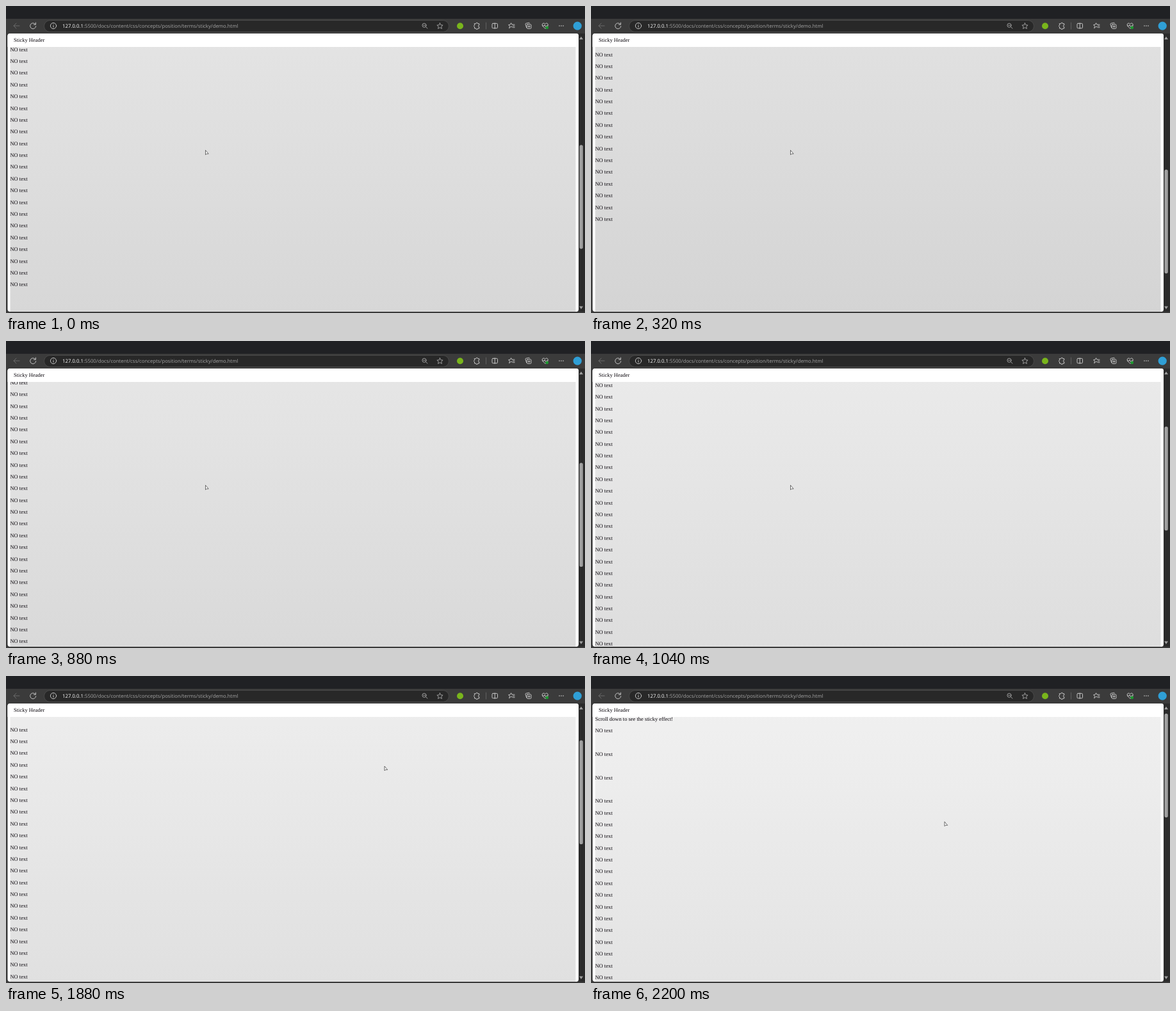
An HTML page that plays this animation: 904 px wide and 480 px high, repeating every 2380 ms.

```html
<!DOCTYPE html>
<html lang="en">
<head>
<meta charset="utf-8">
<title>Sticky header</title>
<style>
  html, body { margin: 0; height: 100%; overflow: hidden; background: #3b3b3b; }
  svg { display: block; }
  text { white-space: pre; text-rendering: geometricPrecision; }
  .page { font: 8.47px "Liberation Serif", "Times New Roman", serif; fill: #0c080e; }
  .url { font: 7.79px "Open Sans", "Noto Sans", sans-serif; fill: #a5a5a5; }
  .icon { fill: none; stroke: #d2d2d2; stroke-width: .9; stroke-linecap: round; stroke-linejoin: round; }
</style>
</head>
<body>
<svg width="904" height="480" viewBox="0 0 904 480">
  <defs>
    <linearGradient id="shade" x2="0" y2="1">
      <stop stop-color="#f0f0f0"/><stop offset="1" stop-color="#d0d0d0"/>
    </linearGradient>
    <clipPath id="view"><rect x="2.5" y="43" width="891.5" height="435" rx="4"/></clipPath>
    <path id="star" d="M0-4.6 1.4-1.6 4.6-1.3 2.2.9 2.9 4.1 0 2.4-2.9 4.1-2.2.9-4.6-1.3-1.4-1.6Z"/>
  </defs>

  <!-- browser frame -->
  <rect width="904" height="480" fill="#3b3b3b"/>
  <rect width="904" height="20" fill="#202124"/>
  <rect x="59.5" y="22.5" width="632" height="18" rx="9" fill="#282828" stroke="#505050" stroke-width=".8"/>
  <text class="url" x="88" y="34"><tspan fill="#fff">127.0.0.1</tspan>:5500/docs/content/css/concepts/position/terms/sticky/demo.html</text>

  <g class="icon">
    <path d="M21 31H12M16 27 12 31 16 35" stroke="#707070"/>
    <path d="M45.9 28.6A4.5 4.5 0 1 0 46.7 31.6M46.4 26V29H43.4"/>
    <circle cx="74" cy="31" r="4.6"/>
    <path d="M74 30.5V33.3M74 28.6V28.7"/>
    <g stroke="#a8a8a8">
      <circle cx="653" cy="30.2" r="3.1"/><path d="M655.3 32.5 658 35M651.6 30.2H654.4"/>
      <use href="#star" x="677.5" y="31.3"/>
    </g>
    <path d="M731.5 27.7H733.7A1.5 1.5 0 0 1 736.7 27.7H738.8V29.9A1.4 1.4 0 0 0 738.8 32.7V35H736.7A1.5 1.5 0 0 1 733.7 35H731.5V32.7A1.5 1.5 0 0 1 731.5 29.9Z"/>
    <path d="M749.5 26V36" stroke="#666"/>
    <rect x="759" y="27.3" width="8.5" height="7.4" rx="1.3"/><path d="M763.2 26.6V35.4"/>
    <path d="M791 33.3 788.5 32 785.7 34.7 786.4 31.5 784.6 29.5 787.2 29.1 788.6 26.6 790 29.1H794M791.5 31.3H794M792 33.6H794"/>
    <path d="M812.5 33.5 811 28.5Q810.8 27.5 811.8 27.2L816.5 26.2Q817.3 26.2 817.5 27"/>
    <rect x="813.3" y="28.7" width="6.6" height="6.7" rx="1.3"/><path d="M816.6 30.4V33.7M815 32H818.2"/>
    <path d="M841.7 35.2 838 31.5C835.5 28.5 839 25 841.7 28.2 844.4 25 848 28.5 845.4 31.5ZM837.5 31H840L841 29.5 842.5 32.5 843.5 31H846"/>
  </g>
  <circle cx="709" cy="31.3" r="5" fill="#79b51c"/>
  <circle cx="844.7" cy="33.8" r="2.4" fill="#1c9a30"/>
  <g fill="#d2d2d2"><circle cx="864" cy="31" r=".8"/><circle cx="867" cy="31" r=".8"/><circle cx="870" cy="31" r=".8"/></g>
  <circle cx="892.2" cy="31.2" r="6.6" fill="#2f9fd6"/>

  <!-- page -->
  <g clip-path="url(#view)">
    <rect y="43" width="894" height="435" fill="#fff"/>
    <g id="content" class="page">
      <rect x="6.5" y="47" width="883" height="1096" fill="url(#shade)"/>
      <text x="6.5" y="69.8">Scroll down to see the sticky effect!</text>
    </g>
    <rect y="43" width="894" height="21" fill="#fff"/>
    <text class="page" x="12" y="56">Sticky Header</text>
  </g>

  <!-- scrollbar -->
  <rect x="894" y="43" width="10" height="435" fill="#2b2b2b"/>
  <path d="M895 52.2 898 47.8 901 52.2ZM895 469.5 898 473.9 901 469.5Z" fill="#a0a0a0"/>
  <rect id="thumb" x="895.4" width="5.4" height="162.5" rx="2.7" fill="#a0a0a0"/>

  <path id="cursor" d="M0 0V7L1.7 5.6H4.7Z" fill="#fff" stroke="#333" stroke-width=".7" stroke-linejoin="round"/>
</svg>
<script>
const LOOP = 2380, STEP = 40, PITCH = 18.38;
const $ = id => document.getElementById(id);

function addRow(y) {
  const row = document.createElementNS('http://www.w3.org/2000/svg', 'text');
  row.setAttribute('x', 6.5);
  row.setAttribute('y', y);
  row.textContent = 'NO text';
  $('content').append(row);
}
// The first rows are double spaced.
for (let i = 0; i < 3; i++) addRow(88.1 + i * 2 * PITCH);
for (let i = 0; i <= 36; i++) addRow(198.2 + i * PITCH);

const linear = u => u;
const easeIn = u => u * u;
const easeOut = u => u * (2 - u);
const smooth = u => u * u * (3 - 2 * u);

// Keys: time, value, easing towards that value.
const scrollKeys = [
  [0, 421.6], [320, 524], [480, 557.5, easeOut], [560, 557.5], [760, 464, easeIn],
  [1040, 199.9], [1080, 199.9], [1120, 168], [1280, 111.5, easeOut],
  [1880, 111.5], [2200, 0, smooth]
];
const cursorX = [[1120, 311.5], [1400, 575.5, smooth], [1840, 575.5], [1880, 591], [2200, 552, smooth]];
const cursorY = [[1120, 225.5], [1400, 144.8, smooth], [1840, 144.8], [1880, 141], [2200, 227.8, smooth]];

function valueAt(keys, t) {
  const i = keys.findIndex(key => key[0] >= t);
  if (i < 0) return keys.at(-1)[1];
  if (i === 0) return keys[0][1];
  const [t0, v0] = keys[i - 1], [t1, v1, ease = linear] = keys[i];
  return v0 + (v1 - v0) * ease((t - t0) / (t1 - t0));
}

function draw() {
  const t = Math.floor(performance.now() % LOOP / STEP) * STEP;
  const scroll = valueAt(scrollKeys, t);
  $('content').setAttribute('transform', `translate(0 ${-scroll})`);
  $('thumb').setAttribute('y', 58.7 + scroll / 2.66);
  $('cursor').setAttribute('transform', `translate(${valueAt(cursorX, t)} ${valueAt(cursorY, t)})`);
  requestAnimationFrame(draw);
}
draw();
</script>
</body>
</html>
```
